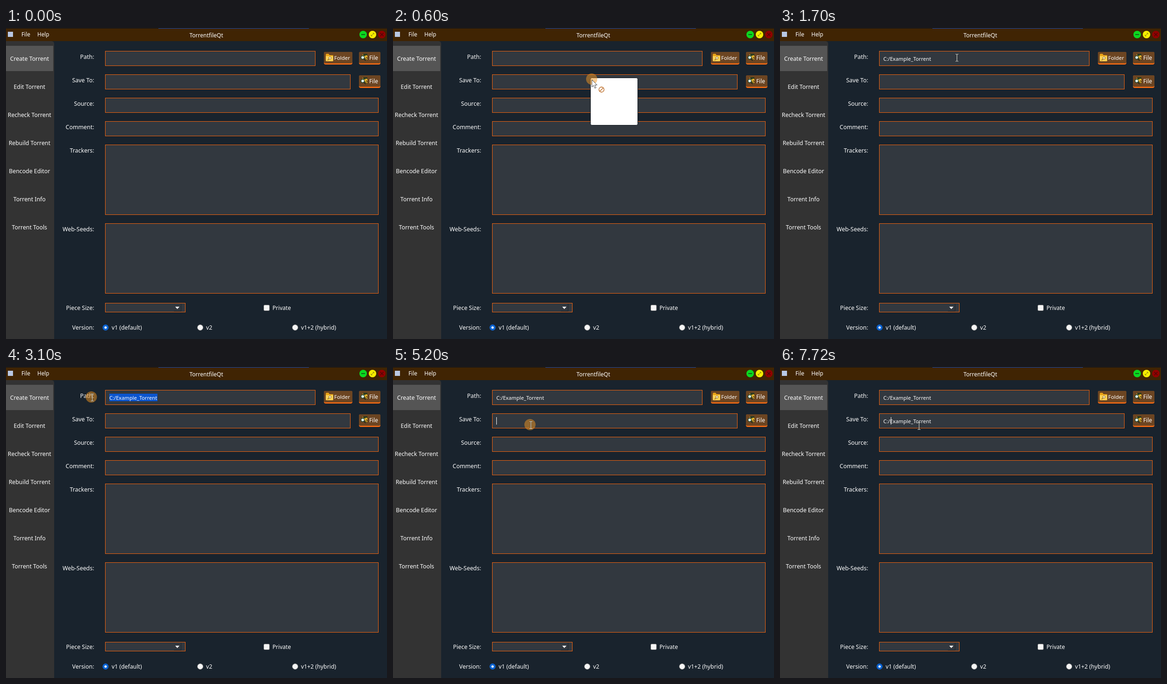
These frames come from a looping animation (815 by 664 pixels, 8000 ms). An HTML page:

```html
<!DOCTYPE html>
<html lang="en">
<head>
<meta charset="utf-8">
<title>TorrentfileQt</title>
<style>
  html, body { margin: 0; width: 100%; height: 100%; overflow: hidden; background: #19232d; }
  svg { display: block; width: 815px; height: 664px; }
  text { font-family: "Noto Sans", "Open Sans", sans-serif; font-size: 12.3px; fill: #fff; white-space: pre; }
  .field { fill: #32383f; stroke: #f2640f; }
  .value { font-size: 11.15px; }
</style>
</head>
<body>
<svg id="stage" viewBox="0 0 815 664" xmlns="http://www.w3.org/2000/svg">
  <defs>
    <g id="folderIcon">
      <path d="M0 2q0-2 2-2h4l2 3h7q1 0 1 1.500v9.500q0 2-2 2H2q-2 0-2-2z" fill="#e8a317"/>
      <path d="M0 5h16v9q0 2-2 2H2q-2 0-2-2z" fill="#ffd053"/>
      <circle cx="9" cy="9" r="2.500" fill="#fff4cf" stroke="#80632c"/>
      <path d="M7 11l-3 3" stroke="#80632c" stroke-width="1.500"/>
    </g>
    <g id="fileIcon">
      <path d="M4 1l10 2v11l-4-1-6-6z" fill="#e9b72d"/>
      <path d="M5 0h9v4l-3-1-2 2-4-1z" fill="#2d3a20"/>
      <path d="M8 9l6 5M11 7l3 3" stroke="#42351a" stroke-width="1.500"/>
      <circle cx="4" cy="8" r="3.500" fill="#f5ffff" stroke="#214b35" stroke-width="1.500"/>
      <path d="M6.500 10.500l4 4" stroke="#17221b" stroke-width="2"/>
    </g>
  </defs>

  <g id="window"></g>

  <rect id="highlight" y="57" height="16" fill="#0b55cf"/>
  <text id="pathText" class="value" x="221" y="70">C:/Example_Torrent</text>
  <text id="saveText" class="value" x="221" y="120">C:/Example_Torrent</text>
  <rect id="caret" y="107" width="1" height="16" fill="#fff"/>

  <g id="drag">
    <rect x="-2.500" y="-3.500" width="101" height="101" rx="3" fill="#fff" stroke="#111820"/>
    <g id="denied" fill="none" stroke="#b9651c" stroke-width="1.300">
      <circle cx="21" cy="21.500" r="5.500"/>
      <path d="M17.200 25.300l7.600-7.600"/>
    </g>
  </g>
  <circle id="halo" r="12" fill="#f29620" fill-opacity=".5"/>
  <path id="arrow" d="M.5.500V16l3.500-3.400 2.800 6 2.600-1.200-2.700-5.700h4.800z" fill="#fff" stroke="#15191d" stroke-width=".8"/>
  <g id="beam" fill="none">
    <path d="M-3-7.500h2.500l.5.500.5-.5H3M0-7V7M-3 7.500h2.500L0 7l.5.500H3" stroke="#10161c" stroke-width="2.200" opacity=".5"/>
    <path d="M-3-7.500h2.500l.5.500.5-.5H3M0-7V7M-3 7.500h2.500L0 7l.5.500H3" stroke="#f4f4e8"/>
  </g>
</svg>
<script>
const NS = "http://www.w3.org/2000/svg";
const byId = id => document.getElementById(id);
const base = byId("window");

function add(tag, attrs, content) {
  const node = document.createElementNS(NS, tag);
  for (const key in attrs) node.setAttribute(key, attrs[key]);
  if (content) node.textContent = content;
  base.append(node);
  return node;
}
const rect = (x, y, width, height, fill, rx = 0) => add("rect", { x, y, width, height, fill, rx });
const circle = (cx, cy, r, fill, stroke = "none") => add("circle", { cx, cy, r, fill, stroke });
const line = (d, stroke, width = 1) => add("path", { d, stroke, "stroke-width": width, fill: "none" });
const label = (str, x, y, size = 12.3, anchor = "start") =>
  add("text", { x, y, "text-anchor": anchor, style: `font-size:${size}px` }, str);
const field = (x, y, right, bottom) =>
  add("rect", { class: "field", x: x + .5, y: y + .5, width: right - x - 1, height: bottom - y - 1 });

function button(x, y, width, icon, str, size) {
  rect(x, y, width, 27, "#ff6d12", 4);
  rect(x, y, width, 24.500, "#6c4522", 3);
  add("use", { href: "#" + icon, x: x + 4, y: y + 4 });
  label(str, x + 22, y + 17, size);
}

function buildTitleBar() {
  rect(0, 0, 815, 28, "#402403");
  rect(0, 0, 815, 1, "#10151d");
  rect(326, 0, 322, 1, "#0c47b8");
  rect(4, 8, 11, 11, "#b9c8e4");
  label("File", 33, 18, 11.8);
  label("Help", 67, 18, 11.7);
  label("TorrentfileQt", 428.500, 20, 12, "middle");
  circle(764, 14, 8, "#0bd820");
  line("M760 14h8", "#143d17", 1.500);
  circle(784, 14, 8, "#f7ee00");
  line("M781 17l6-6M784.500 11H787v2.500M781 14.500V17h2.500", "#857b16");
  circle(804, 14, 8, "#920000");
  line("M800.500 10.500l7 7M807.500 10.500l-7 7", "#4b0808", 1.300);
}

function buildSidebar() {
  add("path", { d: "M0 28h97q6 0 6 6v630H0z", fill: "#333" });
  rect(0, 38, 101, 54, "#555");
  ["Create Torrent", "Edit Torrent", "Recheck Torrent", "Rebuild Torrent",
    "Bencode Editor", "Torrent Info", "Torrent Tools"]
    .forEach((str, i) => label(str, 50.300, 70 + 60 * i, 12.3, "middle"));
}

function buildForm() {
  const rows = { "Path:": 66, "Save To:": 116, "Source:": 166, "Comment:": 216,
    "Trackers:": 266, "Web-Seeds:": 434, "Piece Size:": 602, "Version:": 644 };
  for (const str in rows) label(str, 188.500, rows[str], 12.4, "end");

  field(212, 49, 662, 81);
  field(212, 99, 737, 131);
  field(212, 149, 797, 181);
  field(212, 199, 797, 231);
  field(212, 249, 797, 399);
  field(212, 417, 797, 567);
  field(212, 587, 384, 607);
  line("M359 604.500h15.500V589", "#1b222a");
  add("path", { d: "M362 595h9l-4.500 5z", fill: "#fff" });

  button(680, 51, 61, "folderIcon", "Folder", 11.4);
  button(755, 51, 46, "fileIcon", "File", 11.8);
  button(755, 101, 46, "fileIcon", "File", 11.8);

  add("rect", { x: 551.5, y: 591.5, width: 12, height: 12, rx: 2, fill: "#f5f5f5", stroke: "#8a8a8a" });
  label("Private", 570, 602, 12.1);
  circle(213, 639.500, 6.5, "#0b63d1");
  circle(213, 639.500, 2.5, "#fff");
  circle(415.500, 639.500, 6, "#f5f5f5", "#8a8a8a");
  circle(618.500, 639.500, 6, "#f5f5f5", "#8a8a8a");
  label("v1 (default)", 226, 644, 12.3);
  label("v2", 428, 644, 12.3);
  label("v1+2 (hybrid)", 631, 644, 12.3);
}

buildTitleBar();
buildSidebar();
buildForm();

const LOOP = 8000;
// Pointer track: time, x, y
const track = [
  [300, 770, 247], [400, 640, 190], [500, 510, 142], [600, 425, 110],
  [800, 400, 84], [1100, 383, 57], [1300, 376, 58], [1400, 377, 63],
  [1700, 378.5, 63.5], [2000, 378.5, 63.5], [2100, 380.5, 63.5], [2200, 382, 64],
  [2300, 382, 64], [2500, 415, 61], [2600, 422, 60], [2700, 392, 58],
  [2900, 260, 58], [3000, 206, 61], [3100, 184.5, 65], [3200, 184.5, 65],
  [3300, 181.5, 63], [3400, 181.5, 63], [3900, 203, 80], [4000, 203, 80],
  [4300, 198, 84], [4400, 201, 83], [4500, 201, 83], [4700, 235, 102],
  [4900, 285, 121], [5000, 295, 124], [6000, 295, 124], [6100, 297.5, 126]
];

function pointerAt(t) {
  const next = track.findIndex(key => key[0] > t);
  if (next < 0) return track[track.length - 1].slice(1);
  if (next === 0) return track[0].slice(1);
  const [t0, x0, y0] = track[next - 1], [t1, x1, y1] = track[next];
  const k = (t - t0) / (t1 - t0);
  return [x0 + (x1 - x0) * k, y0 + (y1 - y0) * k];
}

function caretAt(t) {
  if (t >= 5200 && t < 5800) return 221;
  if (t >= 5900 && t < 7010) return 324;
  if (t >= 7210 && t < 7320) return 237;
  if (t >= 7320 && t < 7720) return 229;
  return t >= 7720 ? 237 : null;
}

const show = (id, on) => byId(id).setAttribute("visibility", on ? "visible" : "hidden");
const move = (id, x, y) => byId(id).setAttribute("transform", `translate(${x} ${y})`);
const within = (t, from, to) => t >= from && t < to;

function draw(t) {
  const step = Math.floor(t / 100) * 100;
  const [x, y] = pointerAt(step);
  const dragging = within(t, 300, 1700);
  const isArrow = dragging || within(t, 3300, 4700);
  const pressed = dragging || within(t, 2500, 3200) || within(t, 5200, 5300);

  show("drag", dragging);
  show("denied", dragging && y > 81);
  show("arrow", isArrow);
  show("beam", t >= 300 && !isArrow);
  show("halo", pressed);
  move("drag", x, y);
  move("arrow", x, y);
  move("beam", x, y);
  move("halo", isArrow ? x : x - 2, y - 1);

  const selecting = within(t, 2600, 5200);
  const left = step > 3000 ? 221 : Math.min(324, Math.max(221, x));
  show("highlight", selecting);
  byId("highlight").setAttribute("x", left);
  byId("highlight").setAttribute("width", 324 - left);

  show("pathText", t >= 1700);
  show("saveText", t >= 5900);
  const caretX = caretAt(t);
  show("caret", caretX !== null);
  if (caretX !== null) byId("caret").setAttribute("x", caretX);
}

const start = performance.now();
function tick() {
  draw((performance.now() - start) % LOOP);
  requestAnimationFrame(tick);
}
tick();
</script>
</body>
</html>
```
